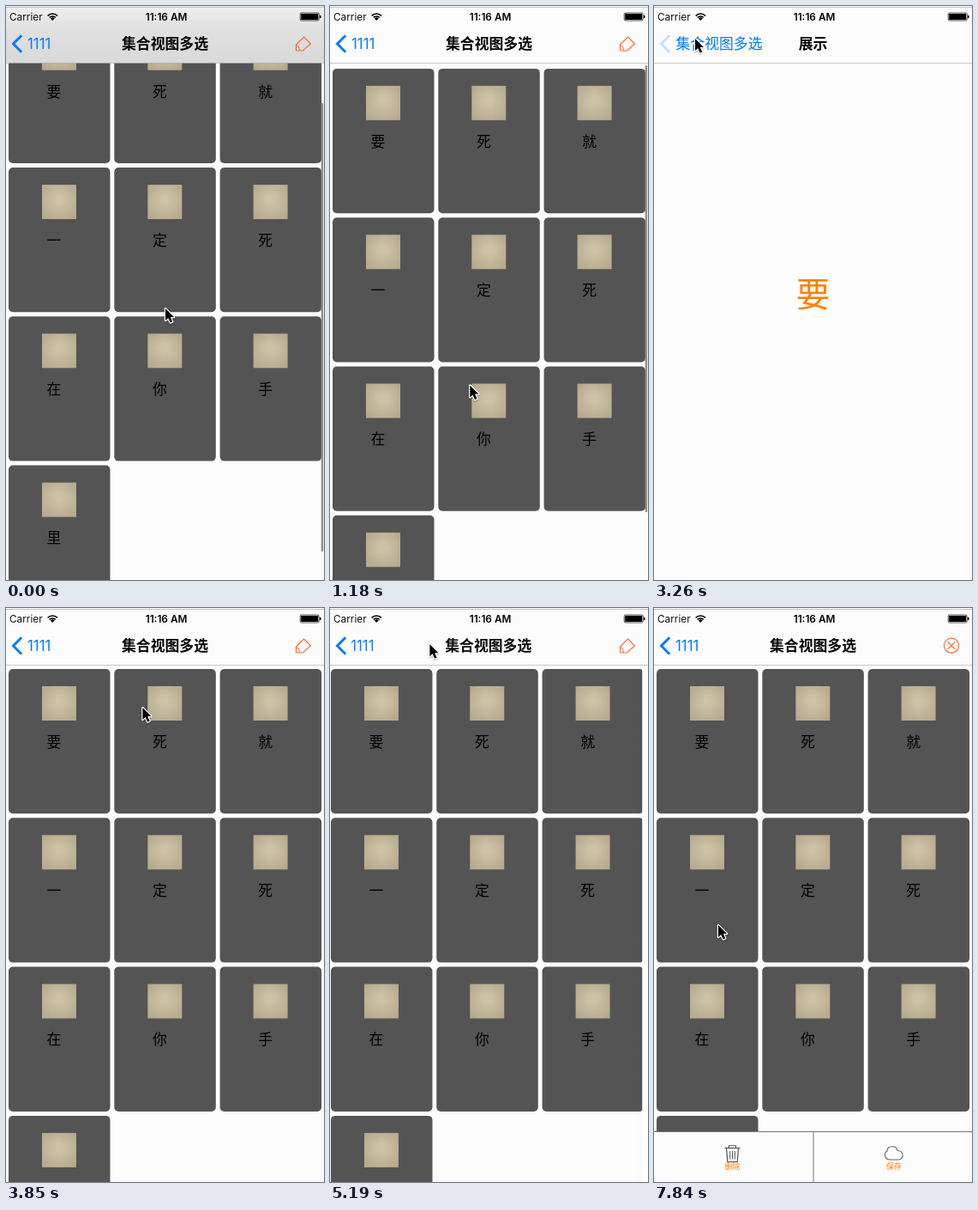
Recreate the animation shown at these times as an HTML page with a canvas. Size 371 by 668 pixels, loop 7990 ms.

```html
<!DOCTYPE html>
<html lang="zh">
<head>
<meta charset="utf-8">
<title>集合视图多选</title>
<style>
  html, body { margin: 0; width: 100%; height: 100%; overflow: hidden; background: #fdfdfd; }
  canvas { display: block; width: 371px; height: 668px; }
</style>
</head>
<body>
<canvas id="stage"></canvas>
<script>
const W = 371, H = 668, LOOP = 7990, STEP = 148;
const BLUE = '#007aff', ORANGE = '#ff8000', CORAL = '#ff6a35', PAPER = '#fdfdfd';
const FONT = 'Inter, "Noto Sans CJK SC", "Noto Sans CJK", sans-serif';
const BAR = 66, REST = 71, PITCH = 173.3;
const WORDS = [...'要死就一定死在你手里'];

const canvas = document.getElementById('stage');
const ctx = canvas.getContext('2d');
const dpr = window.devicePixelRatio || 1;
canvas.width = W * dpr;
canvas.height = H * dpr;

const clamp = v => Math.max(0, Math.min(1, v));
const smooth = v => { v = clamp(v); return v * v * (3 - 2 * v); };

// Critically damped spring from 0 to 1.
function spring(ms, rate) {
  const x = Math.max(0, ms / 1000 * rate);
  return x > 6.5 ? 1 : 1 - (1 + x) * Math.exp(-x);
}

// Pointer stops: time, x, y.
const PATH = [
  [0, 186, 352], [730, 191, 536], [960, 185, 500], [1770, 69, 187],
  [2100, 69, 187], [3050, 48, 38], [3480, 48, 38], [3920, 168, 122],
  [4080, 168, 122], [4440, 56, 67], [4740, 46, 40], [4940, 46, 40],
  [5700, 344, 49], [6200, 344, 49], [7100, 136, 335], [7480, 104, 403],
  [7840, 75, 369], [7990, 75, 369]
];

function pointerAt(t) {
  let i = 1;
  while (i < PATH.length - 1 && t > PATH[i][0]) i++;
  const [t0, x0, y0] = PATH[i - 1], [t1, x1, y1] = PATH[i];
  const k = smooth((t - t0) / (t1 - t0));
  return [x0 + (x1 - x0) * k, y0 + (y1 - y0) * k];
}

// Top of the first row: dragged with rubber banding, then bouncing back.
function gridTop(t) {
  const top = 14.7 + pointerAt(Math.min(t, 730))[1] - 352;
  if (top <= REST) return top;
  const view = H - BAR;
  const pull = view * (1 - 1 / ((top - REST) * 0.43 / view + 1));
  return REST + pull * (1 - spring(t - 760, 12));
}

// 0 shows the grid, 1 shows the detail page.
function pushAt(t) {
  const s = start => spring(t - start, 18);
  return clamp(s(1867) - s(3460) + s(4030) - s(4850));
}

function faded(alpha, draw) {
  if (alpha <= 0.005) return;
  ctx.save();
  ctx.globalAlpha *= Math.min(1, alpha);
  draw();
  ctx.restore();
}

function text(str, x, cy, size, color, weight = 400, align = 'center') {
  ctx.font = `${weight} ${size}px ${FONT}`;
  ctx.textAlign = align;
  ctx.fillStyle = color;
  ctx.fillText(str, x, cy + size * 0.375);
}

function rect(x, y, w, h, color) {
  ctx.fillStyle = color;
  ctx.fillRect(x, y, w, h);
}

function pill(x, y, w, h, r, color) {
  ctx.beginPath();
  ctx.roundRect(x, y, w, h, r);
  ctx.fillStyle = color;
  ctx.fill();
}

function line(points, color, width, close) {
  ctx.beginPath();
  points.forEach(([x, y]) => ctx.lineTo(x, y));
  if (close) ctx.closePath();
  ctx.strokeStyle = color;
  ctx.lineWidth = width;
  ctx.stroke();
}

function circle(x, y, r, color, width) {
  ctx.beginPath();
  ctx.arc(x, y, r, 0, Math.PI * 2);
  ctx.strokeStyle = color;
  ctx.lineWidth = width;
  ctx.stroke();
}

function thumb(x, y) {
  const g = ctx.createRadialGradient(x + 20, y + 17, 4, x + 20, y + 20, 29);
  g.addColorStop(0, '#cdc2a7');
  g.addColorStop(1, '#b2a589');
  rect(x, y, 40, 40, g);
}

function grid(top) {
  WORDS.forEach((word, i) => {
    const x = 3 + (i % 3) * 123.3;
    const y = top + Math.floor(i / 3) * PITCH;
    pill(x, y, 118.5, 168.3, 5, '#545454');
    thumb(x + 39, y + 20);
    text(word, x + 53, y + 84.5, 16.8, '#000');
  });
}

function scrollBar(t, top) {
  const over = Math.max(0, top - REST);
  const y = 69 + Math.max(0, REST - top) * 0.78;
  faded(1 - clamp((t - 1250) / 250), () =>
    pill(367.7, y, 2.5, 522 - over, 1.2, '#8f8f8f'));
}

function detail(p, word) {
  if (p <= 0.001) return;
  const x = W * (1 - p);
  if (x > 0.5) {
    const g = ctx.createLinearGradient(x - 9, 0, x, 0);
    g.addColorStop(0, 'rgba(0,0,0,0)');
    g.addColorStop(1, `rgba(0,0,0,${0.2 * clamp(p * 4)})`);
    rect(x - 9, 0, 9, H, g);
  }
  rect(x, 0, W, H, PAPER);
  text(word, x + W / 2, 335, 39.6, ORANGE);
}

function statusBar() {
  rect(0, 1, W, 1, '#c4c4c4');
  text('Carrier', 4, 12.5, 11.8, '#111', 400, 'left');
  text('11:16 AM', 187, 12.5, 11.8, '#000', 600);
  // Signal fan
  ctx.lineCap = 'butt';
  [2, 5, 8].forEach((r, i) => {
    ctx.beginPath();
    ctx.arc(54.3, 17, r, -Math.PI * 0.75, -Math.PI * 0.25);
    ctx.strokeStyle = '#000';
    ctx.lineWidth = i ? 1.7 : 3;
    ctx.stroke();
  });
  // Battery
  ctx.beginPath();
  ctx.roundRect(343.2, 8, 22, 9, 1.5);
  ctx.strokeStyle = '#000';
  ctx.lineWidth = 0.7;
  ctx.stroke();
  rect(344.2, 9, 20, 7, '#000');
  pill(366, 10.7, 1.5, 3.6, 0.7, '#000');
}

function pencil() {
  line([[338.5, 52], [338.5, 45], [347.5, 36], [355.5, 44], [346.5, 52]], CORAL, 1.2, true);
  line([[338.5, 46], [341.5, 47], [342.5, 52]], CORAL, 1);
}

function closeIcon() {
  circle(347, 43.7, 8.6, CORAL, 1.2);
  line([[342.8, 39.5], [351.2, 47.9]], CORAL, 1.2);
  line([[351.2, 39.5], [342.8, 47.9]], CORAL, 1.2);
}

function navBar(t, p, top) {
  const dark = clamp((REST - top) / 56.3);
  const tone = v => { const c = Math.round(252 - v * dark); return `rgb(${c},${c},${c})`; };
  const g = ctx.createLinearGradient(0, 0, 0, BAR);
  g.addColorStop(0, tone(12));
  g.addColorStop(0.4, tone(28));
  g.addColorStop(1, tone(35));
  rect(0, 0, W, BAR, g);
  rect(0, BAR, W, 0.7, '#b4b4b4');
  statusBar();

  const pressed = (t > 3180 && t < 3460) || (t > 4730 && t < 4850);
  faded(pressed ? 0.22 : 1, () =>
    line([[18.2, 34.3], [8.5, 44], [18.2, 53.7]], BLUE, 2.9));
  faded((1 - p) ** 2, () => text('1111', 25 - 44 * p, 44, 16.8, BLUE, 400, 'left'));

  const x = W / 2 - 109.5 * p ** 1.25;
  faded((1 - p) ** 2, () => text('集合视图多选', x, 44, 16.85, '#000', 600));
  faded(p, () => text('集合视图多选', x, 44, 16.85, BLUE));
  faded((1 - p) ** 2.5, t < 6200 ? pencil : closeIcon);
  faded(p * 1.3, () => text('展示', W / 2 + 225 * (1 - p), 44, 16.85, '#000', 600));
}

function trash(x, y) {
  const c = '#555';
  line([[x - 9, y - 6.5], [x + 9, y - 6.5]], c, 1.2);
  line([[x - 4, y - 6.5], [x - 4, y - 9.3], [x + 4, y - 9.3], [x + 4, y - 6.5]], c, 1.1);
  line([[x - 7, y - 6.5], [x - 5.7, y + 9.5], [x + 5.7, y + 9.5], [x + 7, y - 6.5]], c, 1.2);
  [-2.8, 0, 2.8].forEach(d => line([[x + d, y - 3], [x + d, y + 6.5]], c, 1));
}

function cloud(x, y) {
  ctx.beginPath();
  ctx.moveTo(x - 4.5, y + 7);
  ctx.bezierCurveTo(x - 11.5, y + 7, x - 12, y - 1.5, x - 8, y - 3);
  ctx.bezierCurveTo(x - 8, y - 10, x + 3, y - 10, x + 4, y - 3.5);
  ctx.bezierCurveTo(x + 12, y - 4, x + 12, y + 7, x + 5, y + 7);
  ctx.closePath();
  ctx.strokeStyle = '#666';
  ctx.lineWidth = 1.1;
  ctx.stroke();
}

function toolBar(t) {
  const k = smooth((t - 6200) / 250);
  if (!k) return;
  ctx.save();
  ctx.translate(0, 59 * (1 - k));
  rect(0, 609, W, 60, '#fcfcfc');
  rect(0, 609, W, 1, '#777');
  rect(185.5, 610, 1, 58, '#777');
  trash(91.5, 635);
  cloud(280, 635);
  text('删除', 91.5, 650, 9, ORANGE);
  text('保存', 280, 650, 9, ORANGE);
  ctx.restore();
}

function pointer(t) {
  const [x, y] = pointerAt(t);
  const shape = [[0, 0], [0, 14], [3.2, 11], [5.7, 16.6], [8.2, 15.5], [5.8, 10], [10, 10]];
  ctx.save();
  ctx.translate(x, y);
  ctx.lineJoin = 'round';
  ctx.shadowColor = 'rgba(0,0,0,0.3)';
  ctx.shadowBlur = 2 * dpr;
  ctx.shadowOffsetY = dpr;
  line(shape, '#fff', 2.4, true);
  ctx.shadowColor = 'transparent';
  ctx.fillStyle = '#000';
  ctx.fill();
  ctx.restore();
}

function render(t) {
  const p = pushAt(t), top = gridTop(t);
  ctx.setTransform(dpr, 0, 0, dpr, 0, 0);
  rect(0, 0, W, H, PAPER);
  ctx.save();
  ctx.translate(-W * 0.3 * p, 0);
  grid(top);
  scrollBar(t, top);
  ctx.restore();
  detail(p, t < 3900 ? WORDS[0] : WORDS[1]);
  navBar(t, p, top);
  toolBar(t);
  pointer(t);
}

const start = performance.now();
function tick() {
  const t = (performance.now() - start) % LOOP;
  render(Math.min(53, Math.floor((t + 10) / STEP)) * STEP);
  requestAnimationFrame(tick);
}
tick();
</script>
</body>
</html>
```
